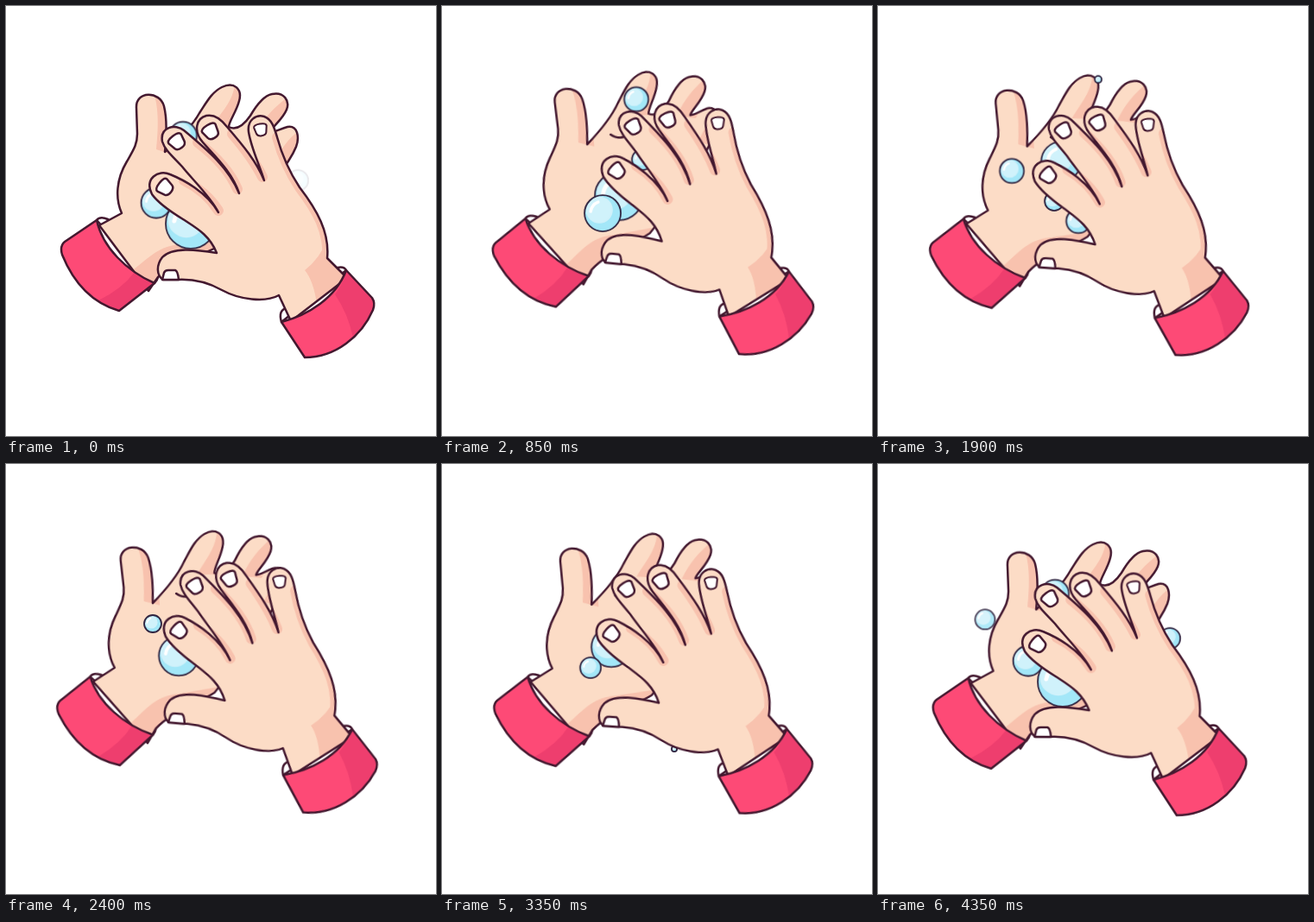
Animation of 498x498 px, one loop 4400 ms. Source, as an HTML page without scripts:

```html
<!DOCTYPE html>
<html lang="en">
<head>
<meta charset="utf-8">
<title>Washing hands</title>
<style>
html, body { margin: 0; width: 100%; height: 100%; overflow: hidden; background: #fff; }
svg { display: block; width: 100vw; height: 100vh; }
.line { stroke: #43182f; stroke-width: 2.5; stroke-linejoin: round; stroke-linecap: round; }
.skin { fill: #fcdcc6; }
.cuff { fill: #fd4a76; }
.dark { fill: #ee3e6e; }
.white { fill: #fff; }
.none { fill: none; }
.shade { fill: #f8c2ae; }
.soft { fill: none; stroke: #f8c2ae; stroke-linecap: round; }

/* one rub there and back, three times per loop */
.hand { animation: rub 1.466667s infinite; }
.left { transform-origin: 80px 340px; --turn: -5.6deg; }
.right { transform-origin: 384px 385px; --turn: 6.2deg; }
@keyframes rub {
  0% { transform: rotate(0deg); animation-timing-function: cubic-bezier(.33, .1, .67, 1); }
  50% { transform: rotate(var(--turn)); animation-timing-function: cubic-bezier(.33, .06, .68, .8); }
  100% { transform: rotate(0deg); }
}

/* a bubble swells, rests, then bursts */
.foam use { animation: swell 4.4s linear infinite; animation-delay: var(--d); }
@keyframes swell {
  0% { transform: scale(0); opacity: 1; }
  7% { transform: scale(1); }
  12% { transform: scale(1); opacity: 1; }
  13.2%, 100% { transform: scale(1); opacity: 0; }
}
</style>
</head>
<body>
<svg viewBox="0 0 498 498">
<defs>
  <g id="bubble">
    <circle r="10" fill="#a3e7f8"/>
    <circle cx="-1.8" cy="-1.8" r="7.4" fill="#d0f2fb"/>
    <path d="M-6.6,-1 A6.6,6.6 0 0 1 -2.5,-6.2" fill="none" stroke="#fff" stroke-width="1.7" stroke-linecap="round"/>
    <circle r="10" fill="none" stroke="#2f2440" stroke-width="1.8" vector-effect="non-scaling-stroke"/>
  </g>
  <path id="nail" class="line white" d="M-9,-4 Q-9,-8 0,-8 Q9,-8 9,-4 L7,5 Q6,9 0,9 Q-6,9 -7,5 Z"/>
  <path id="palm" d="M108,254 L134,240 C126,222 128,200 140,180 C148,166 152,160 152,148 L151,118 C150,98 178,98 183,116 C187,132 186,150 184,169
    C200,155 215,140 224,124 C232,112 238,100 250,94 C264,87 274,96 270,110 C267,122 258,134 258,140
    Q270,146 283,127 C290,115 298,104 308,102 C322,99 329,110 325,120 C320,132 308,140 306,146
    C312,146 318,142 326,140 C338,138 340,152 336,163 C330,178 320,190 312,200 L262,262 L247,278 C225,290 195,296 176,314 L165,330 Z"/>
  <path id="back" d="M316,335 C300,344 270,340 250,329 C232,319 215,316 198,317 L182,317 C174,312 174,300 181,291 C192,279 220,282 244,286
    C236,266 222,258 205,247 C192,239 176,228 169,218 C160,200 176,189 190,195 C205,201 232,215 246,239
    C238,222 215,200 204,186 C194,175 184,167 181,157 C178,140 196,136 206,144 C235,168 258,188 270,217
    C262,192 240,172 228,158 C216,144 221,130 232,127 C242,125 250,132 256,140 C275,162 290,180 299,202
    C294,185 284,165 281,146 C279,132 290,125 299,128 C308,131 311,142 314,152 C320,174 328,192 340,210
    C360,236 375,262 372,292 L395,315 L330,365 Z"/>
  <clipPath id="inPalm"><use href="#palm"/></clipPath>
  <clipPath id="inBack"><use href="#back"/></clipPath>
  <path id="cuffL" d="M105,248 L68,273 Q62,278 65,288 C78,320 100,344 131,353 L172,321 C140,307 112,280 105,248 Z"/>
  <path id="cuffR" d="M319,366 C350,358 382,338 394,306 L424,338 Q428,344 425,352 C412,382 382,407 346,407 Z"/>
</defs>

<g class="hand left">
  <path class="line white" d="M105,248 Q109,243 118,247 L174,304 Q179,314 172,321 Z"/>
  <use href="#palm" class="skin"/>
  <g clip-path="url(#inPalm)">
    <path class="shade" d="M170,98 C178,118 176,146 174,166 L192,172 V98 Z"/>
    <path class="shade" d="M265,88 C264,110 250,122 238,140 L262,142 L280,100 Z"/>
    <path class="shade" d="M326,106 C312,116 300,128 290,146 L312,150 L332,116 Z"/>
    <path class="shade" d="M340,144 C328,152 320,164 312,178 L330,184 Z"/>
    <path class="shade" d="M144,308 C164,294 176,276 206,276 L250,272 L240,300 L165,332 Z"/>
  </g>
  <use href="#palm" class="line none"/>
  <path class="line none" d="M212,160 Q219,166 227,164"/>
  <use href="#cuffL" class="cuff"/>
  <path class="dark" d="M107,341 Q134,328 149,308 Q160,317 172,321 L131,353 Q118,350 107,341 Z"/>
  <use href="#cuffL" class="line none"/>
</g>

<g class="foam">
  <g style="--d:-4.15s">
    <g transform="translate(196 205) scale(2.2)"><use href="#bubble"/></g>
    <g transform="translate(160 178) scale(1)"><use href="#bubble"/></g>
  </g>
  <g style="--d:-3.95s">
    <g transform="translate(232 178) scale(1.2)"><use href="#bubble"/></g>
    <g transform="translate(205 220) scale(2.8)"><use href="#bubble"/></g>
    <g transform="translate(186 240) scale(2.1)"><use href="#bubble"/></g>
    <g transform="translate(225 108) scale(1.4)"><use href="#bubble"/></g>
  </g>
  <g style="--d:-3.54s">
    <g transform="translate(254 137) scale(1.5)"><use href="#bubble"/></g>
    <g transform="translate(194 192) scale(2.7)"><use href="#bubble"/></g>
    <g transform="translate(168 159) scale(.7)"><use href="#bubble"/></g>
    <g transform="translate(175 240) scale(.35)"><use href="#bubble"/></g>
  </g>
  <g style="--d:-3.13s">
    <g transform="translate(192 240) scale(2.4)"><use href="#bubble"/></g>
    <g transform="translate(205 148) scale(1.3)"><use href="#bubble"/></g>
  </g>
  <g style="--d:-2.9s">
    <g transform="translate(212 180) scale(2.3)"><use href="#bubble"/></g>
    <g transform="translate(204 226) scale(1.1)"><use href="#bubble"/></g>
    <g transform="translate(232 249) scale(1.4)"><use href="#bubble"/></g>
    <g transform="translate(155 191) scale(1.4)"><use href="#bubble"/></g>
    <g transform="translate(255 85) scale(.4)"><use href="#bubble"/></g>
  </g>
  <g style="--d:-2.35s">
    <g transform="translate(200 222) scale(2.3)"><use href="#bubble"/></g>
    <g transform="translate(170 185) scale(1)"><use href="#bubble"/></g>
  </g>
  <g style="--d:-1.95s">
    <g transform="translate(214 206) scale(1.3)"><use href="#bubble"/></g>
    <g transform="translate(192 243) scale(3)"><use href="#bubble"/></g>
    <g transform="translate(226 124) scale(1.5)"><use href="#bubble"/></g>
    <g transform="translate(117 232) scale(1.05)"><use href="#bubble"/></g>
  </g>
  <g style="--d:-1.4s">
    <g transform="translate(196 212) scale(2.3)"><use href="#bubble"/></g>
    <g transform="translate(172 236) scale(1.2)"><use href="#bubble"/></g>
  </g>
  <g style="--d:-1.155s">
    <g transform="translate(269 330) scale(.9)"><use href="#bubble"/></g>
  </g>
  <g style="--d:-1s">
    <g transform="translate(233 188) scale(1.2)"><use href="#bubble"/></g>
    <g transform="translate(182 201) scale(.9)"><use href="#bubble"/></g>
    <g transform="translate(176 172) scale(.95)"><use href="#bubble"/></g>
    <g transform="translate(253 105) scale(1.2)"><use href="#bubble"/></g>
    <g transform="translate(127 113) scale(.45)"><use href="#bubble"/></g>
  </g>
  <g style="--d:-.584s">
    <g transform="translate(124 180) scale(1.15)"><use href="#bubble"/></g>
  </g>
  <g style="--d:-.574s">
    <g transform="translate(338 202) scale(1.2)"><use href="#bubble"/></g>
  </g>
  <g style="--d:-.44s">
    <g transform="translate(205 150) scale(1.6)"><use href="#bubble"/></g>
    <g transform="translate(174 228) scale(1.75)"><use href="#bubble"/></g>
    <g transform="translate(214 252) scale(2.9)"><use href="#bubble"/></g>
  </g>
</g>

<g class="hand right">
  <path class="line white" d="M319,366 Q315,352 325,350 L380,304 Q391,300 394,306 Z"/>
  <use href="#back" class="skin"/>
  <g clip-path="url(#inBack)" class="soft" stroke-width="12">
    <path d="M206,202 Q232,215 246,237"/>
    <path d="M222,158 Q256,184 268,212"/>
    <path d="M262,148 Q286,176 297,198"/>
    <path d="M314,152 C320,174 328,192 340,210 C360,236 375,262 372,294"/>
    <path class="shade" stroke="none" d="M372,270 Q364,292 346,306 Q356,318 360,345 L400,315 Z"/>
  </g>
  <use href="#back" class="line none"/>
  <use href="#nail" transform="translate(184 210) rotate(-52)"/>
  <use href="#nail" transform="translate(198 157) rotate(-38)"/>
  <use href="#nail" transform="translate(237 145) rotate(-32)"/>
  <use href="#nail" transform="translate(295 143) rotate(-10) scale(.82)"/>
  <path class="line white" d="M181,317 L183,309 Q184,306 188,306 L196,306 Q199,307 200,317 Z"/>
  <use href="#cuffR" class="cuff"/>
  <path class="dark" d="M381,334 Q390,322 394,306 L424,338 Q428,344 425,352 Q417,370 402,384 Q396,356 381,334 Z"/>
  <use href="#cuffR" class="line none"/>
</g>
</svg>
</body>
</html>
```
